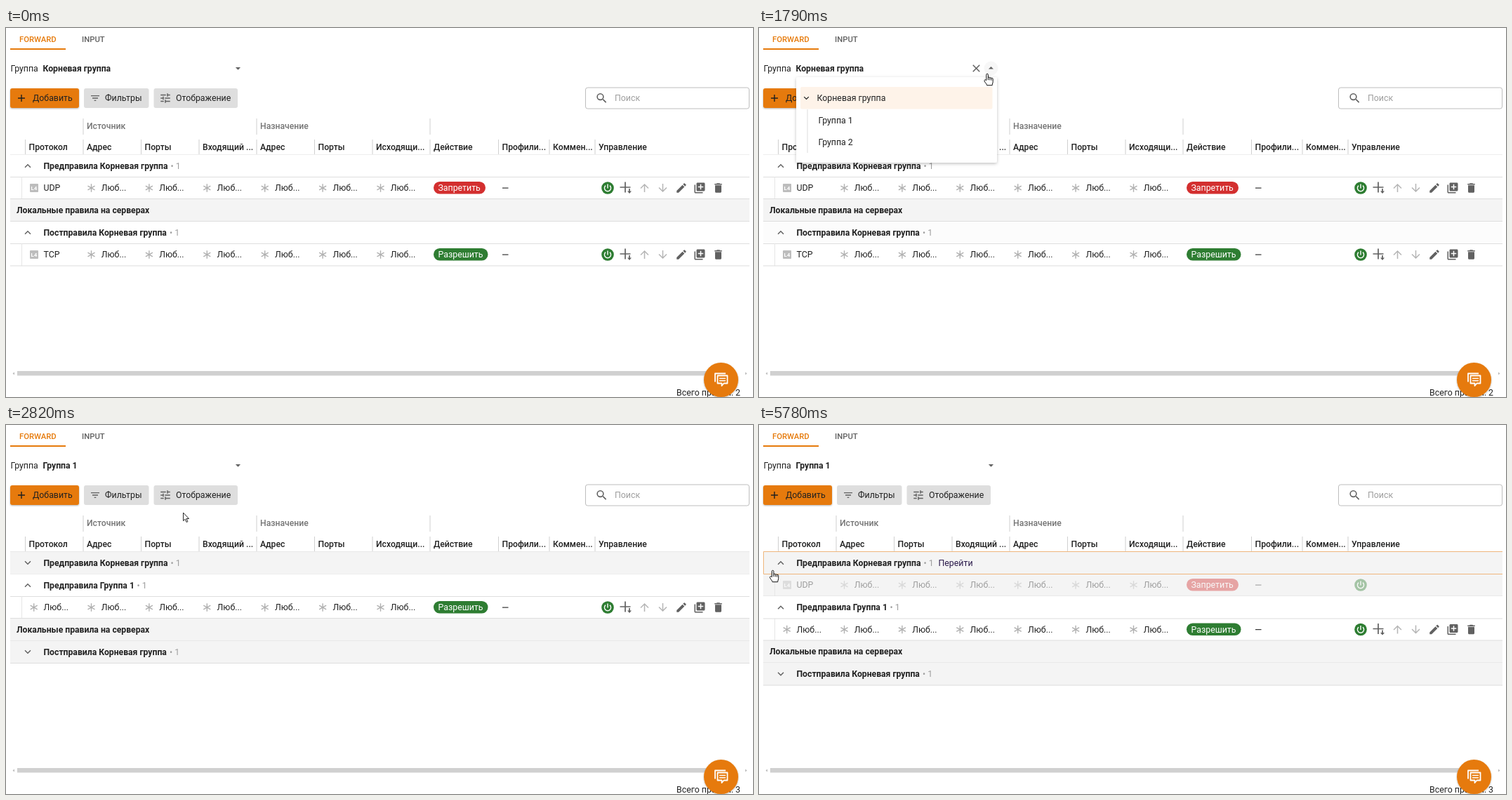
Recreate the animation shown at these times as an HTML page. Size 1064x526 px, loop 5.84 s.

```html
<!DOCTYPE html>
<html lang="ru">
<head>
<meta charset="utf-8">
<title>Правила</title>
<style>
html, body { margin: 0; width: 100%; height: 100%; overflow: hidden; background: #fff; }
svg { display: block; width: 1064px; height: 526px; }
text { font: 400 12.35px Roboto, sans-serif; white-space: pre; }
.m { font-weight: 500; font-size: 12.2px; }
.b { font-weight: 700; font-size: 12.2px; }
</style>
</head>
<body>
<svg id="stage" viewBox="0 0 1064 526"></svg>
<script>
const LOOP = 5840;
const ORANGE = '#e67a0a', GREEN = '#2e7d32', RED = '#d32f2f';
const LINE = '#dedede', BAND = '#f4f4f4', ICON = '#616161', PALE = '#b5b5b5';

const PATHS = {
  add: 'M19 13h-6v6h-2v-6H5v-2h6V5h2v6h6z',
  filter: 'M10 18h4v-2h-4zM3 6v2h18V6zm3 7h12v-2H6z',
  tune: 'M3 17v2h6v-2H3zM3 5v2h10V5H3zm10 16v-2h8v-2h-8v-2h-2v6h2zM7 9v2H3v2h4v2h2V9H7zm14 4v-2H11v2h10zm-6-4h2V7h4V5h-4V3h-2v6z',
  search: 'M15.5 14h-.79l-.28-.27A6.47 6.47 0 0016 9.5 6.5 6.5 0 109.5 16c1.61 0 3.09-.59 4.23-1.57l.27.28v.79l5 4.99L20.49 19zm-6 0a4.5 4.5 0 110-9 4.5 4.5 0 010 9z',
  up: 'M4 12l1.41 1.41L11 7.83V20h2V7.83l5.58 5.59L20 12l-8-8z',
  down: 'M20 12l-1.41-1.41L13 16.17V4h-2v12.17l-5.58-5.59L4 12l8 8z',
  less: 'M12 8.3l-6 6 1.41 1.41L12 11.13l4.59 4.58L18 14.3z',
  more: 'M12 15.7l6-6-1.41-1.41L12 12.87 7.41 8.29 6 9.7z',
  edit: 'M3 17.25V21h3.75L17.81 9.94l-3.75-3.75zM20.71 7.04a1 1 0 000-1.41l-2.34-2.34a1 1 0 00-1.41 0l-1.83 1.83 3.75 3.75z',
  copy: 'M4 6H2v14c0 1.1.9 2 2 2h14v-2H4zm16-4H8c-1.1 0-2 .9-2 2v12c0 1.1.9 2 2 2h12c1.1 0 2-.9 2-2V4c0-1.1-.9-2-2-2zm-1 9h-4v4h-2v-4H9V9h4V5h2v4h4z',
  trash: 'M6 19c0 1.1.9 2 2 2h8c1.1 0 2-.9 2-2V7H6zM19 4h-3.5l-1-1h-5l-1 1H5v2h14z',
  clear: 'M19 6.41L17.59 5 12 10.59 6.41 5 5 6.41 10.59 12 5 17.59 6.41 19 12 13.41 17.59 19 19 17.59 13.41 12z',
  dropDown: 'M7 10l5 5 5-5z',
  dropUp: 'M7 14l5-5 5 5z'
};

const text = (x, y, s, cls = '', fill = '#212121', extra = '') =>
  `<text x="${x}" y="${y + 4}" class="${cls}" fill="${fill}" style="${extra}">${s}</text>`;
const rect = (x, y, w, h, fill, attrs = '') =>
  `<rect x="${x}" y="${y}" width="${w}" height="${h}" fill="${fill}" ${attrs}/>`;
const icon = (name, x, y, size = 18, fill = ICON) =>
  `<path d="${PATHS[name]}" fill="${fill}" transform="translate(${x - size / 2} ${y - size / 2}) scale(${size / 24})"/>`;
const group = (id, body, attrs = '') => `<g id="${id}" ${attrs}>${body}</g>`;
const rule = y => rect(6, y - .5, 1053, 1, LINE);

function star(x, y) {
  const arm = a => `<path d="M-5.8 0H5.8" transform="translate(${x} ${y}) rotate(${a})" stroke="#b0b0b0" stroke-width="1.4"/>`;
  return [30, 90, 150].map(arm).join('');
}

function chip(y, allow) {
  return rect(609, y - 9, allow ? 77.5 : 74, 17.5, allow ? GREEN : RED, 'rx="8.7"') +
    text(615.5, y, allow ? 'Разрешить' : 'Запретить', '', '#fff');
}

const powerButton = y => `<circle cx="857" cy="${y}" r="8.8" fill="${GREEN}"/>
  <path d="M-3 -3.4A4.6 4.6 0 103 -3.4M0 -5.6V.4" transform="translate(857 ${y})" fill="none" stroke="#fff" stroke-width="1.4"/>`;

const controls = y =>
  `<path d="M874.5 ${y - 1}h15M882 ${y - 8.5}v15M888 ${y + 1}v5" stroke="${ICON}" stroke-width="1.7"/>` +
  `<path d="M885 ${y + 4.5}h6l-3 3.5z" fill="${ICON}"/>` +
  icon('up', 909.5, y, 18, PALE) + icon('down', 935.5, y, 18, PALE) +
  icon('edit', 962, y) + icon('copy', 988, y) + icon('trash', 1014.5, y);

function ruleRow(y, protocol, allow, inherited) {
  const first = protocol
    ? rect(34, y - 6, 12, 12, '#bdbdbd', 'rx="1"') +
      text(35.4, y - 1, 'L4', 'b', '#fff', 'font-size:8px') + text(53.5, y, protocol)
    : star(39.7, y) + text(53.5, y, 'Люб...');
  const any = [0, 1, 2, 3, 4, 5].map(i =>
    star(121.5 + i * 82.4, y) + text(135.8 + i * 82.4, y, 'Люб...')).join('');
  const body = first + any + chip(y, allow) + rect(707, y - .5, 8.5, 1.2, '#333') + powerButton(y);
  return (inherited ? rect(6, y - 16, 1053, 32, BAND) : '') +
    `<g opacity="${inherited ? .4 : 1}">${body}</g>` + (inherited ? '' : controls(y)) +
    rect(22, y - 16, 1, 32, '#e6e6e6') + rule(y + 16);
}

function groupRow(y, title, countX, open, fill) {
  return rect(6, y - 16, 1053, 32, fill || (open ? '#fff' : BAND)) + icon(open ? 'less' : 'more', 31, y, 18) +
    text(53.5, y, title, 'b') + text(countX, y, '• 1', '', '#9e9e9e') + rule(y + 16);
}

const localRow = y => rect(6, y - 16, 1053, 32, BAND) + rule(y - 16) +
  text(15, y, 'Локальные правила на серверах', 'b') + rule(y + 16);

const PRE = 'Предправила Корневая группа', POST = 'Постправила Корневая группа';
const PRE_ONE = 'Предправила Группа 1';

function toolbar() {
  return text(19, 16, 'FORWARD', 'm', ORANGE, 'font-size:11.3px') +
    text(108, 16, 'INPUT', 'm', '#616161', 'font-size:11.3px') +
    rect(6, 29, 79, 2, ORANGE) + text(6.5, 58, 'Группа') +
    rect(6, 86, 98, 28, ORANGE, 'rx="3" filter="url(#soft)"') + icon('add', 22, 100, 17, '#212121') +
    text(38, 100, 'Добавить') +
    rect(111, 86, 92.5, 28, '#dedede', 'rx="3"') + icon('filter', 127, 100, 16) + text(141, 100, 'Фильтры') +
    rect(210.5, 86, 119.5, 28, '#dedede', 'rx="3"') + icon('tune', 227, 100, 18) + text(242, 100, 'Отображение') +
    rect(825.5, 85, 233, 30, '#fff', 'rx="3" stroke="#bdbdbd"') + icon('search', 848.5, 100, 19) +
    text(867, 100, 'Поиск', '', '#9e9e9e');
}

function tableHead() {
  const columns = [[27, 'Протокол'], [109.5, 'Адрес'], [192, 'Порты'], [274.5, 'Входящий ...'], [356.5, 'Адрес'],
    [439, 'Порты'], [521.5, 'Исходящи...'], [603.5, 'Действие'], [701, 'Профили...'], [773.5, 'Коммен...'], [838.5, 'Управление']];
  return [[109.5, 'Источник'], [356.5, 'Назначение'], [603.5, '']].map(([x, s]) =>
    rect(x, 129, 1, 23, '#d0d0d0') + text(x + 5.5, 140, s, 'm', '#757575')).join('') +
    columns.map(([x, s]) => rect(x, 159, 1, 21, '#d0d0d0') + text(x + 5.5, 169.5, s, 'm')).join('') + rule(180.5);
}

const chat = `<g fill="none" stroke="#fff" stroke-width="1.8" stroke-linejoin="round">
  <path d="M1010 504.5V492.5H1025"/>
  <path d="M1013.500 495.500H1027.500V506.500H1022.500L1019.500 510V506.500H1013.500Z"/>
  <path d="M1016 499.500H1025M1016 502.800H1025" stroke-width="1.5"/></g>`.replace(/00(?=[A-Z" ])/g, '');

function footer() {
  return rect(16, 489, 1020, 6.5, '#d0d0d0') +
    '<path d="M12 490.5v4l-2.5-2zM1053 490.5v4l2.5-2z" fill="#bbb"/>' +
    text(955, 520, 'Всего правил: <tspan id="total"></tspan>') +
    `<circle cx="1018.5" cy="501.5" r="24.5" fill="${ORANGE}" filter="url(#soft)"/>` + chat;
}

const menu = rect(53, 70, 286, 122, '#fff', 'rx="3" filter="url(#lift)"') +
  rect(59, 84, 273.5, 31.5, '#fef3e9', 'rx="2"') + icon('more', 67.5, 100, 15, '#212121') + text(82.5, 100, 'Корневая группа') +
  rect(78, 116, 254.5, 31, BAND, 'rx="2" id="hover"') + rect(68.5, 116, 1, 62, LINE) +
  text(84.5, 131.5, 'Группа 1') + text(84.5, 163, 'Группа 2');

const outline = 'fill="#fff" stroke="#111" stroke-linejoin="round"';
const arrow = `<path d="M0 0V11.6L2.7 9.2 4.6 13.5 6.4 12.7 4.5 8.5H8z" ${outline} stroke-width=".9"/>`;
const hand = `<path transform="translate(-.4 -.8)" d="M-1.3 9.5V1.4a1.3 1.3 0 012.6 0V6a1.2 1.2 0 012.4 .3 1.2 1.2 0 012.3 .5 1.1 1.1 0 012.1 .6V11.5c0 2-1 2.5-1 5H-.5c0-2-3-4-3.6-6.3C-4.4 8.5-2.5 8-1.3 9.5zM1.3 6v3M3.7 6.5v2.7M6 7v2.4" ${outline}/>`;

const shadow = (id, dy, blur, alpha) => `<filter id="${id}" x="-20%" y="-20%" width="140%" height="150%">
  <feDropShadow dx="0" dy="${dy}" stdDeviation="${blur}" flood-opacity="${alpha}"/></filter>`;

document.getElementById('stage').innerHTML =
  `<defs>${shadow('soft', 1, 1.3, .3)}${shadow('lift', 1.5, 2.2, .25)}</defs>` + toolbar() + tableHead() +
  group('root', groupRow(196.5, PRE, 234.5, true) + ruleRow(228, 'UDP', false) + localRow(259.5) +
    group('postHover', rect(6, 276, 1053, 31, '#fcfcfc')) +
    groupRow(291.5, POST, 233, true, 'none') + ruleRow(323, 'TCP', true)) +
  group('folded', groupRow(196.5, PRE, 234.5, false) + groupRow(228.5, PRE_ONE, 186.5, true) +
    ruleRow(260, '', true) + localRow(291.5) + groupRow(323.5, POST, 233, false)) +
  group('unfolded', groupRow(196.5, PRE, 234.5, true, BAND) + text(255.5, 196.5, 'Перейти', '', '#2a1a4a') +
    ruleRow(228, 'UDP', false, true) + groupRow(260, PRE_ONE, 186.5, true) + ruleRow(291.5, '', true) +
    localRow(323) + groupRow(355, POST, 233, false) +
    '<path d="M1059 180.5H6.5V212.5H1059" fill="none" stroke="#efb67c"/>') +
  footer() + text(52.5, 57.5, '<tspan id="value"></tspan>', 'b') +
  group('clear', icon('clear', 309.5, 57.5)) +
  group('halo', '<circle cx="330.5" cy="57.5" r="10" fill="#f7f7f7"/>') +
  group('closed', icon('dropDown', 330.5, 57.5, 17)) + group('opened', icon('dropUp', 330.5, 57, 17)) +
  group('menu', menu) + group('cursor', group('arrow', arrow) + group('hand', hand));

// Pointer moves: first step, last step, number of steps, start, end, ease-out power
const MOVES = [
  [280, 860, 9, [979, 502], [391, 120], 1.3],
  [930, 1290, 6, [391, 120], [325.5, 66], 1.8],
  [2010, 2520, 8, [325.5, 66], [252.5, 125.5], 1.6],
  [2740, 2740, 1, [252.5, 125.5], [252.5, 125], 1],
  [3320, 3850, 8, [252.5, 125], [40.5, 197], 2.1],
  [3920, 3920, 1, [40.5, 197], [32.5, 200.5], 1],
  [5200, 5200, 1, [32.5, 200.5], [28.5, 201], 1],
  [5480, 5480, 1, [28.5, 201], [25, 202], 1],
  [5780, 5780, 1, [25, 202], [20, 208], 1]
];

function pointer(t) {
  const move = MOVES.filter(m => t >= m[0]).pop();
  if (!move) return MOVES[0][3];
  const [start, end, count, from, to, power] = move;
  const step = t >= end ? count : 1 + Math.floor((t - start) / (end - start) * (count - 1));
  const k = 1 - (1 - step / count) ** power;
  return from.map((a, i) => a + (to[i] - a) * k);
}

// Latest value of a [time, value] table
const at = (t, steps) => steps.reduce((v, [time, next]) => t >= time ? next : v, 0);
const el = Object.fromEntries([...document.querySelectorAll('[id]')].map(e => [e.id, e]));
const show = (id, on) => { el[id].style.display = on ? '' : 'none'; };

function render(t) {
  const [x, y] = pointer(t);
  const menuAlpha = at(t, [[1650, .35], [1720, .8], [1790, 1], [2670, .7], [2740, .25], [2820, 0]]);
  const hasMenu = t >= 1650 && t < 2670;
  const isHand = (t >= 1150 && t < 2740) || t >= 3850;
  show('root', t < 2740);
  show('postHover', t >= 430);
  show('folded', t >= 2740 && t < 4210);
  show('unfolded', t >= 4210);
  show('clear', t >= 1150 && t < 2670);
  show('halo', t >= 1220 && t < 2010);
  show('opened', hasMenu);
  show('closed', !hasMenu);
  show('hover', y > 115);
  show('cursor', t >= 280);
  show('hand', isHand);
  show('arrow', !isHand);
  el.menu.style.opacity = menuAlpha;
  el.value.textContent = t < 2670 ? 'Корневая группа' : 'Группа 1';
  el.total.textContent = t < 2740 ? 2 : 3;
  el.cursor.setAttribute('transform', `translate(${x} ${y})`);
}

const origin = performance.now();
function tick() {
  render((performance.now() - origin) % LOOP);
  requestAnimationFrame(tick);
}
tick();
</script>
</body>
</html>
```
